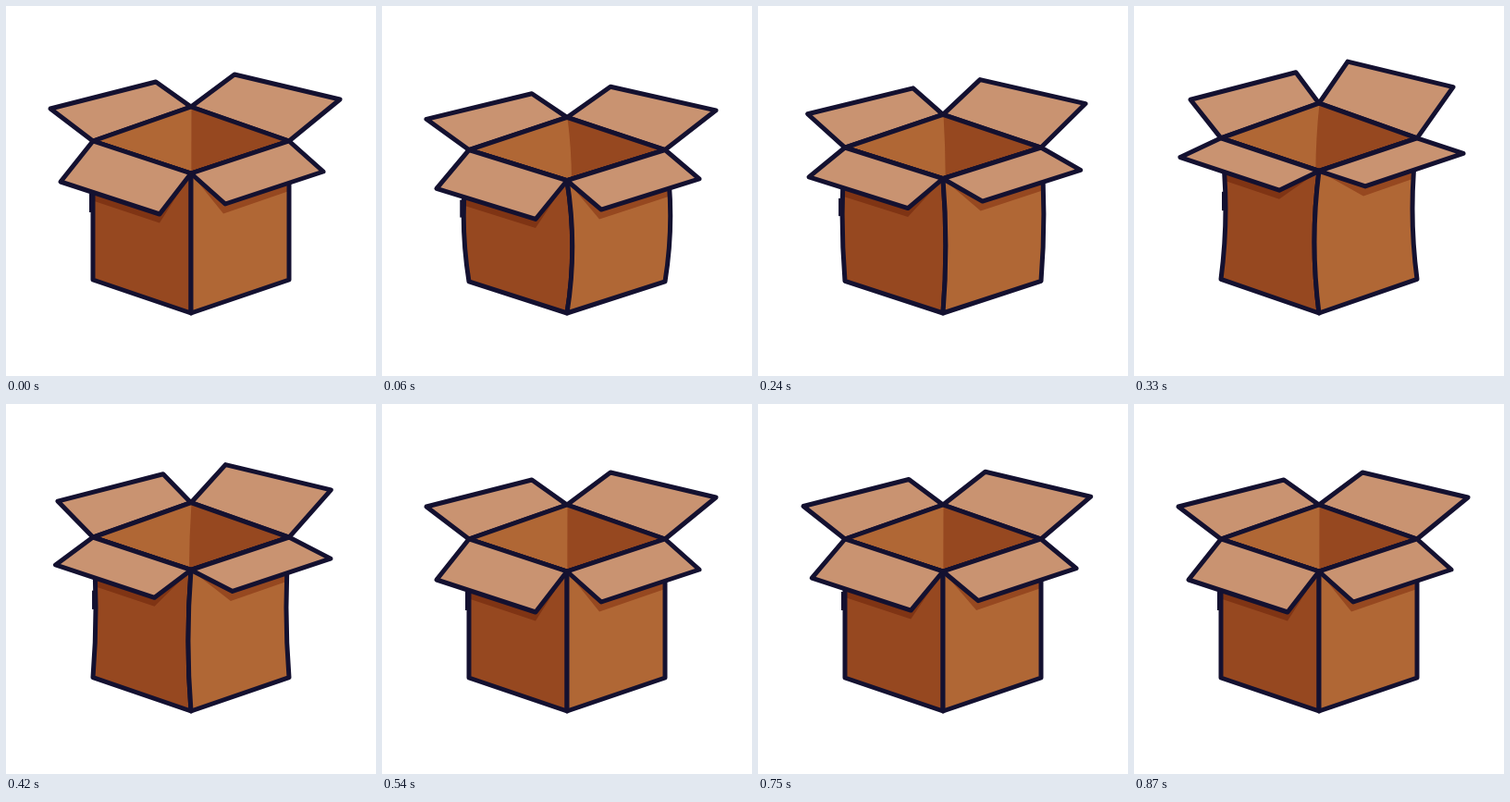
Animation, 400 px wide and 400 px high, one loop 9.9 s. Source, as an HTML page with a canvas:

```html
<!DOCTYPE html>
<html lang="en">
<head>
<meta charset="utf-8">
<title>Box</title>
<style>
  html, body { margin: 0; width: 100%; height: 100%; overflow: hidden; background: #fff; }
  canvas { display: block; width: 400px; height: 400px; }
</style>
</head>
<body>
<canvas id="stage" width="400" height="400"></canvas>
<script>
const ctx = document.getElementById('stage').getContext('2d');
const LOOP = 9900, STEP = 30, FLOOR = 332;
const INK = '#141130', DARK = '#964820', MID = '#b06735', LIGHT = '#c99371';
const SHADE_L = '#7f3414', SHADE_R = '#964820';

const clamp = v => Math.min(1, Math.max(0, v));
const mix = (a, b, u) => a + (b - a) * u;
const easeOut = u => 1 - (1 - u) * (1 - u);
const easeInOut = u => u * u * (3 - 2 * u);
const span = (t, a, b) => clamp((t - a) / (b - a));

// Squash, spring up with the flaps lifting, settle, small flap bounce.
function pose(t) {
  if (t < 150) {
    const u = easeOut(span(t, 0, 150));
    return { scale: mix(1, 0.92, u), bow: 9 * u, lift: 0 };
  }
  if (t < 330) {
    const u = Math.pow(easeInOut(span(t, 150, 330)), 1.2);
    return { scale: mix(0.92, 1.017, u), bow: mix(9, -5, u), lift: u };
  }
  const u = easeInOut(span(t, 330, 540));
  const bounce = 0.09 * Math.sin(Math.PI * span(t, 540, 870));
  return { scale: mix(1.017, 1, u), bow: mix(-5, 0, u), lift: 1 - u + bounce };
}

function poly(points) {
  ctx.beginPath();
  points.forEach(([x, y]) => ctx.lineTo(x, y));
  ctx.closePath();
}

// Continues the path to b along a side that bulges by `bow` pixels.
function bend(a, b, bow) {
  ctx.quadraticCurveTo((a[0] + b[0]) / 2 + 2 * bow, (a[1] + b[1]) / 2, b[0], b[1]);
}

function fill(color) {
  ctx.fillStyle = color;
  ctx.fill();
}

function paint(color) {
  fill(color);
  ctx.stroke();
}

function facePath(topA, topB, lowB, lowA, bowA, bowB) {
  ctx.beginPath();
  ctx.moveTo(...topA);
  ctx.lineTo(...topB);
  bend(topB, lowB, bowB);
  ctx.lineTo(...lowA);
  bend(lowA, topA, bowA);
  ctx.closePath();
}

function face(corners, bows, color, shade, shadow) {
  facePath(...corners, ...bows);
  fill(color);
  ctx.save();
  ctx.clip();
  poly(shadow);
  fill(shade);
  ctx.restore();
  facePath(...corners, ...bows);
  ctx.stroke();
}

function draw(t) {
  const { scale, bow, lift } = pose(t);
  const at = (x, y, dx = 0, dy = 0) =>
    [x + dx * lift, FLOOR - (FLOOR - y) * scale + dy * lift];
  const drop = ([x, y], dx, dy) => [x + dx, y + dy];

  const back = at(200, 109), left = at(94, 146), front = at(200, 181), right = at(306, 146);
  const lowL = at(94, 296), low = at(200, 332), lowR = at(306, 296);

  const backL = [left, at(48, 111, 13, -6), at(162, 82, 13, -6), back];
  const backR = [back, at(247, 74, -16, -9.5), at(361, 101, -16, -9.5), right];
  const frontL = [left, at(59, 190, -9, -24), at(166, 225, -9, -24), front];
  const frontR = [front, at(237, 214, 13, -17), at(343, 179, 13, -17), right];

  ctx.fillStyle = '#fff';
  ctx.fillRect(0, 0, 400, 400);
  ctx.strokeStyle = INK;
  ctx.lineWidth = 5;
  ctx.lineJoin = ctx.lineCap = 'round';

  poly(backL);
  paint(LIGHT);
  poly(backR);
  paint(LIGHT);

  // Inside walls meeting at the far seam
  const rim = [back, right, front, left];
  poly(rim);
  fill(MID);
  ctx.save();
  ctx.clip();
  ctx.beginPath();
  ctx.moveTo(back[0] + 0.5, back[1]);
  bend(back, at(200.5, 259), bow * 0.8);
  ctx.lineTo(320, 259);
  ctx.lineTo(320, back[1]);
  fill(DARK);
  ctx.restore();
  poly(rim);
  ctx.stroke();

  // Short thickening of the left side below the flap
  const tickX = 92.5 - bow;
  ctx.beginPath();
  ctx.moveTo(...at(tickX, 203));
  ctx.lineTo(...at(tickX, 223));
  ctx.lineCap = 'butt';
  ctx.stroke();
  ctx.lineCap = 'round';

  face([left, front, low, lowL], [-bow, bow], DARK, SHADE_L,
    [left, drop(frontL[1], 0, 9), drop(frontL[2], 0, 9.5), front]);
  face([front, right, lowR, low], [bow, bow], MID, SHADE_R,
    [front, drop(frontR[1], -2, 10.5), drop(frontR[2], -2, 9), right]);

  poly(frontL);
  paint(LIGHT);
  poly(frontR);
  paint(LIGHT);
}

const start = performance.now();
function tick() {
  const t = (performance.now() - start) % LOOP;
  draw(Math.floor(t / STEP) * STEP);
  requestAnimationFrame(tick);
}
tick();
</script>
</body>
</html>
```
